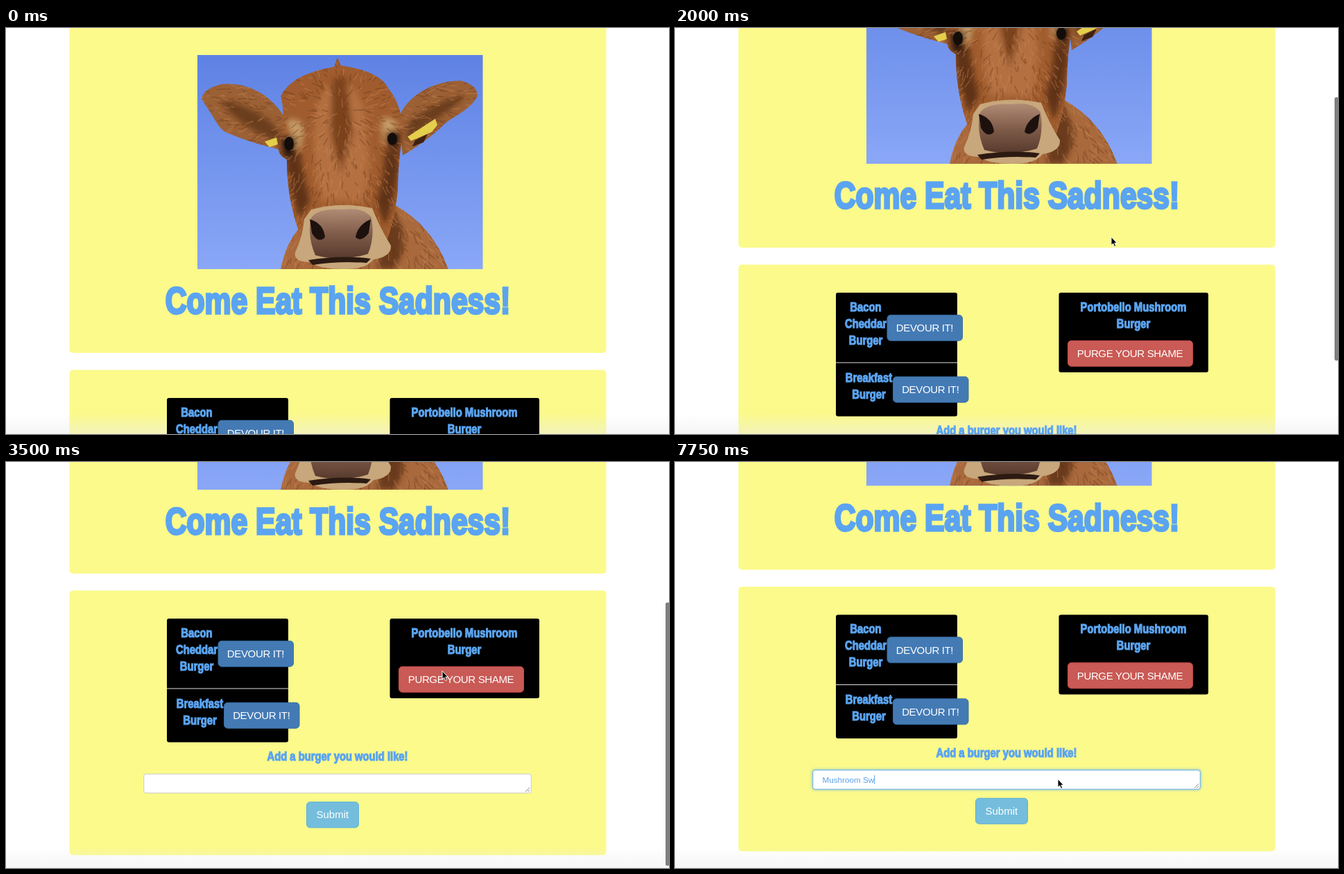
These frames come from a looping animation (956x586 px, 8000 ms). An HTML page:

```html
<!DOCTYPE html>
<html lang="en">
<head>
<meta charset="utf-8">
<title>Burger page</title>
<style>
  html, body { margin: 0; width: 100%; height: 100%; overflow: hidden; background: #fff; }
  svg { display: block; }
  text { font: 15px "Liberation Sans", Arial, sans-serif; text-anchor: middle; fill: #fff; }
  .caps { letter-spacing: -.35px; }
  .panel { fill: #fbfa8b; }
  /* Condensed heavy face */
  .heavy {
    font-size: 18.5px; font-weight: 700; fill: #5ba4f1;
    stroke: #5ba4f1; stroke-width: .065em;
    transform: scaleX(.8); transform-box: fill-box; transform-origin: center;
  }
  .title { font-size: 53.3px; }
  #typed { font-size: 11.7px; text-anchor: start; fill: #5ba0ea; }
  .blue { fill: #447ab4; stroke: #386fa6; }
  .red { fill: #c95a55; stroke: #c44a46; }
  .cyan { fill: #74bddc; stroke: #5fb1d5; }
</style>
</head>
<body>
<svg width="956" height="586" viewBox="0 0 956 586">
  <defs>
    <linearGradient id="sky" x2="0" y2="1">
      <stop stop-color="#5e82e4"/><stop offset="1" stop-color="#8aa7f7"/>
    </linearGradient>
    <linearGradient id="nose" x2="0" y2="1">
      <stop stop-color="#b08b75"/><stop offset=".5" stop-color="#805c4a"/><stop offset="1" stop-color="#573a2d"/>
    </linearGradient>
    <linearGradient id="fade" x2="0" y2="1">
      <stop stop-color="#ececec" stop-opacity="0"/><stop offset="1" stop-color="#ececec" stop-opacity=".5"/>
    </linearGradient>
    <filter id="soft"><feGaussianBlur stdDeviation="4"/></filter>
    <filter id="glow" x="-5%" y="-50%" width="110%" height="200%"><feGaussianBlur stdDeviation="2"/></filter>
    <path id="body" d="M396 348Q402 315 420 292L560 255Q615 285 638 348Z"/>
    <path id="ears" d="M404 132C380 92 345 78 310 81Q283 88 282 103C300 128 306 146 318 151Q350 165 396 176ZM566 130C580 92 625 75 656 76Q680 82 680 98C668 122 640 128 626 145Q600 168 572 184Z"/>
    <path id="head" d="M478 42L483 54Q540 62 552 88Q572 112 573 155Q566 180 565 235Q560 280 548 310H428Q404 250 405 190Q388 182 394 164Q404 130 396 98Q412 66 473 56Z"/>
    <clipPath id="coat"><use href="#body"/><use href="#ears"/><use href="#head"/></clipPath>
  </defs>

  <g class="page">
    <rect class="panel" x="91.5" y="-20" width="774" height="489" rx="5"/>
    <rect class="panel" x="91.5" y="493.5" width="774" height="382" rx="5"/>
  </g>
  <rect y="556" width="956" height="30" fill="url(#fade)"/>

  <g class="page">
    <svg x="276" y="39" width="411.5" height="309" viewBox="276 39 411.5 309">
      <rect x="276" y="39" width="412" height="309" fill="url(#sky)"/>
      <g clip-path="url(#coat)">
        <use href="#body" fill="#a9693c"/>
        <use href="#ears" fill="#9c6035"/>
        <g filter="url(#soft)">
          <path fill="#6b3c1c" d="M396 150C375 125 340 108 308 104Q330 138 390 165ZM578 140Q615 105 664 96Q640 122 606 140L578 166Z"/>
          <path fill="#6b3b1b" d="M550 255Q590 300 560 348H535Z"/>
        </g>
        <use href="#head" fill="#a05c2e"/>
        <g filter="url(#soft)">
          <path fill="#5e3114" d="M402 180Q408 240 425 275L438 250Q428 210 424 180ZM568 172Q565 240 546 285L534 250Q548 210 545 180Z"/>
          <path fill="#b4703f" d="M478 75Q522 90 520 150Q528 200 516 250H454Q440 190 445 140Q446 90 478 75Z"/>
          <path fill="#7b421f" d="M470 75L490 70 500 150 482 210 468 150Z"/>
          <path fill="#c59c68" d="M404 134Q424 126 430 148L424 178 410 150ZM542 132Q560 124 566 144L548 150 542 172Z"/>
          <path fill="#2b180e" d="M396 158L418 156 416 184 400 188ZM548 150L568 150 566 174 552 172Z"/>
        </g>
        <g id="fur" fill="none" stroke-width="1.4" stroke-opacity=".4"></g>
      </g>
      <path fill="#e3cf4c" d="M579 157L619 131 622 140 614 150 584 163ZM373 164L390 158 392 168 380 172Z"/>
      <path fill="#3c2213" d="M586 171L590 162 608 153 602 165Z"/>
      <g fill="#130d0a">
        <ellipse cx="408" cy="167" rx="7" ry="10"/>
        <ellipse cx="557" cy="160" rx="7" ry="9"/>
      </g>
      <!-- muzzle -->
      <path fill="#c7a77b" d="M440 262Q482 250 528 260Q540 290 555 314Q556 330 530 334Q520 348 488 348Q450 348 440 338Q414 338 417 324Q428 300 430 276Z"/>
      <path fill="url(#nose)" d="M440 274Q450 260 484 262Q518 258 527 274Q532 302 522 326Q484 338 446 328Q434 300 440 274Z"/>
      <path fill="#1d110d" d="M438 276Q458 282 460 302Q450 312 441 296ZM526 276Q507 284 504 302Q512 310 523 296Z"/>
      <path fill="#2c1a12" d="M436 335Q485 327 526 333L520 339Q480 336 442 342Z"/>
    </svg>
    <text class="heavy title" x="478.5" y="412.3">Come Eat This Sadness!</text>

    <rect x="232" y="534" width="175" height="178.5" rx="3"/>
    <path stroke="#ddd" d="M232 635H407"/>
    <text class="heavy" x="275" y="561">Bacon</text>
    <text class="heavy" x="275" y="585">Cheddar</text>
    <text class="heavy" x="275" y="609">Burger</text>
    <text class="heavy" x="279.5" y="663">Breakfast</text>
    <text class="heavy" x="279.5" y="687">Burger</text>
    <rect class="blue" x="306" y="566.3" width="108.5" height="37" rx="5"/>
    <text class="caps" x="360" y="590">DEVOUR IT!</text>
    <rect class="blue" x="314.5" y="655.3" width="108.5" height="37" rx="5"/>
    <text class="caps" x="368.3" y="679">DEVOUR IT!</text>

    <rect x="553.5" y="534" width="215.5" height="115" rx="3"/>
    <text class="heavy" x="661" y="561">Portobello Mushroom</text>
    <text class="heavy" x="661" y="585">Burger</text>
    <rect class="red" x="566.5" y="603.3" width="180" height="37" rx="5"/>
    <text class="caps" x="656" y="627">PURGE YOUR SHAME</text>

    <text class="heavy" x="478" y="739.5">Add a burger you would like!</text>
    <rect id="halo" x="198" y="757.5" width="560" height="29" rx="4" fill="#66afe9" filter="url(#glow)"/>
    <rect id="field" x="198.8" y="758.3" width="558.5" height="27.5" rx="3" fill="#fff"/>
    <path stroke="#777" stroke-width=".9" d="M749 784L755 778M752.5 784L755 781.5"/>
    <text id="typed" x="212.5" y="776"></text>
    <rect id="caret" y="765.5" width="1" height="13" fill="#5ba0ea"/>
    <rect class="cyan" x="433.5" y="798.8" width="75" height="37" rx="5"/>
    <text x="470.8" y="822.3">Submit</text>
  </g>

  <rect id="thumb" x="951" width="6" height="380" rx="2.5" fill="#7f7f7f"/>
  <path id="pointer" stroke="#fff" stroke-width="1" d="M0 0V12L2.7 9.6 4.7 14 6.7 13.1 4.8 8.8H8.3Z"/>
</svg>

<script>
const LOOP = 8000, TICK = 250;
const $ = id => document.getElementById(id);
const pages = document.querySelectorAll(".page");

// Each key is [time, value]
const scrollKeys = [[750, 0], [1000, 3], [1250, 16], [1500, 50.5], [2000, 152], [2250, 201],
  [2500, 241.5], [2750, 263], [3000, 277], [3250, 295], [3500, 308], [3750, 313.5]];
const pointerX = [[3500, 629], [3750, 618], [4000, 572], [4250, 553], [4500, 552]];
const pointerY = [[3500, 301.5], [3750, 338], [4000, 425], [4250, 459], [4500, 457.5]];
const typedKeys = [[5750, 0], [6750, 4], [7000, 6], [7500, 10], [7750, 11]];

function track(keys, t) {
  const i = keys.findIndex(key => key[0] >= t);
  if (i < 0) return keys[keys.length - 1][1];
  if (i === 0) return keys[0][1];
  const [t0, a] = keys[i - 1], [t1, b] = keys[i];
  return a + (b - a) * (t - t0) / (t1 - t0);
}

// Short hairs combed away from the brow
function growFur() {
  let seed = 7;
  const random = () => (seed = seed * 16807 % 2147483647) / 2147483647;
  const strands = { "#5f3216": "", "#cb8a55": "" };
  for (const colour in strands) {
    for (let i = 0; i < 900; i++) {
      const x = 280 + 400 * random(), y = 40 + 308 * random();
      const angle = Math.atan2(y - 120, x - 484) + random() - .5;
      const length = 5 + 9 * random();
      strands[colour] += `M${x} ${y}l${length * Math.cos(angle)} ${length * Math.sin(angle)}`;
    }
  }
  $("fur").innerHTML = Object.entries(strands)
    .map(([colour, d]) => `<path stroke="${colour}" d="${d}"/>`).join("");
}

const show = (el, on) => el.setAttribute("visibility", on ? "visible" : "hidden");

function draw(t) {
  const scroll = track(scrollKeys, t);
  pages.forEach(page => page.setAttribute("transform", `translate(0 ${-scroll})`));

  $("thumb").setAttribute("y", scroll * .658);
  show($("thumb"), t >= 1000 && t < 4250);

  $("pointer").setAttribute("transform", `translate(${track(pointerX, t)} ${track(pointerY, t)})`);
  show($("pointer"), t >= 750);

  const focused = t >= 5000;
  $("halo").setAttribute("opacity", focused ? (t < 5250 ? .4 : .8) : 0);
  $("field").setAttribute("stroke", focused ? "#66afe9" : "#ccc");

  $("typed").textContent = "Mushroom Sw".slice(0, Math.round(track(typedKeys, t)));
  $("caret").setAttribute("x", 212.5 + $("typed").getComputedTextLength());
  show($("caret"), focused && (t < 5500 || t >= 6000));
}

function frame() {
  const t = performance.now() % LOOP;
  draw(t - t % TICK);
  requestAnimationFrame(frame);
}

growFur();
frame();
</script>
</body>
</html>
```
